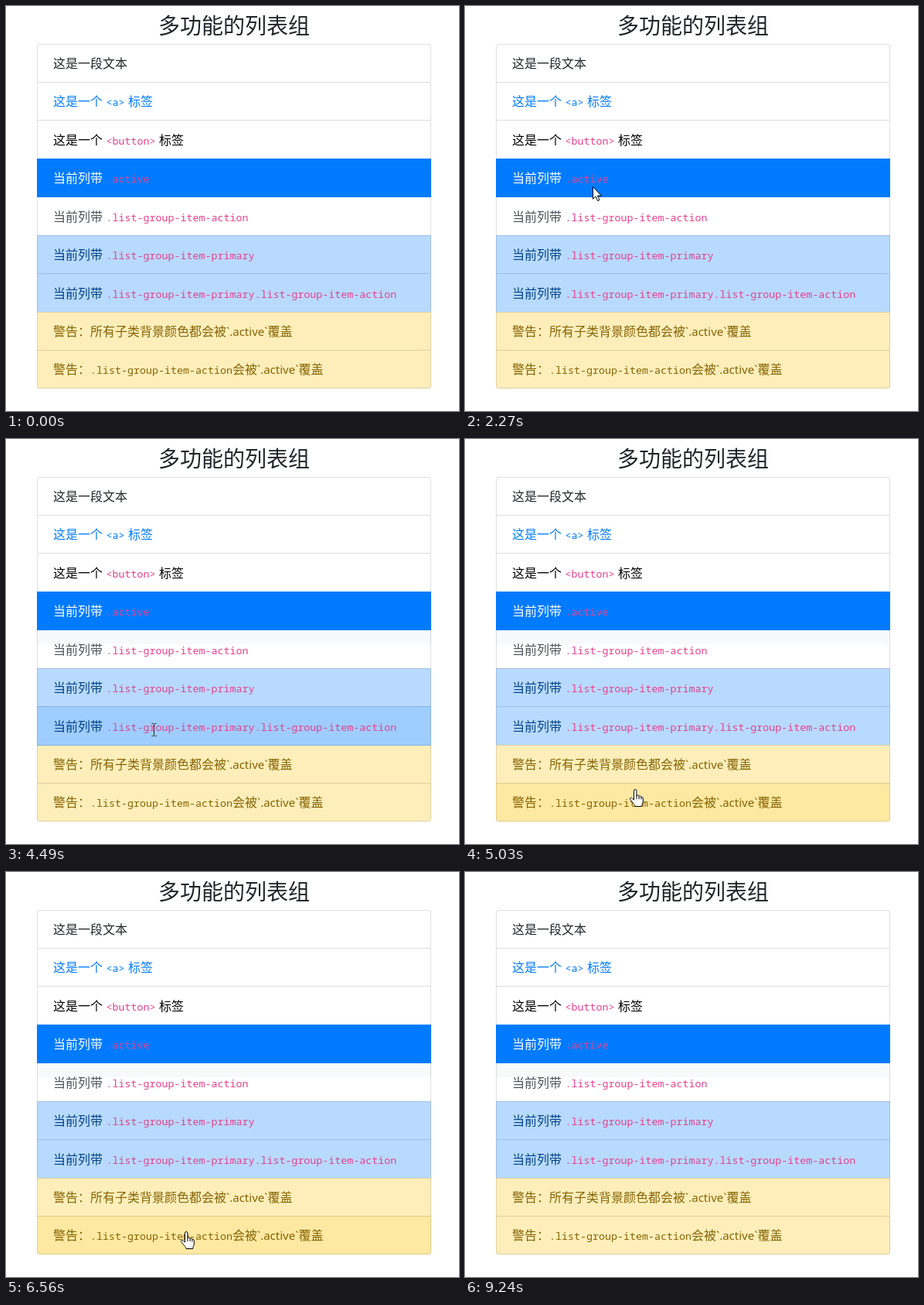
Animation, 586 px wide and 523 px high, one loop 9.34 s. Source, as an HTML page:

```html
<!DOCTYPE html>
<html lang="zh-CN">
<head>
<meta charset="utf-8">
<style>
html, body { margin: 0; width: 100%; height: 100%; overflow: hidden; background: #fff; }
body { position: relative; font: 16px/24px "Noto Sans", "Noto Sans CJK SC", "Noto Sans CJK", sans-serif; word-spacing: .3px; color: #212529; }
h1 { position: absolute; left: 197px; top: 7px; margin: 0; font: 28px/34px "Noto Sans CJK SC", "Noto Sans CJK", sans-serif; white-space: nowrap; }
.row { position: absolute; left: 40px; width: 510px; box-sizing: border-box; padding-left: 20px; border: 1px solid rgba(0,0,0,.125); background: #fff; white-space: nowrap; }
.row:first-child { border-radius: 4px 4px 0 0; }
.row:last-child { border-radius: 0 0 4px 4px; }
.on { z-index: 1; }
code { font: 13.333px/0 "Noto Sans Mono", monospace; color: #e83e8c; }
small { font-size: 15px; line-height: 0; }
.link { color: #007bff; }
.link code, .warn code { color: inherit; }
.link.on { color: #0056b3; text-decoration: underline; }
.button { color: #000; }
.active { z-index: 2; background: #007bff; border-color: #007bff; color: #fff; }
.action { color: #495057; }
.action.on { background: #f8f9fa; }
.action.trail { background: linear-gradient(#f8f9fa 18px, #fff 18px); }
.primary { background: #b8daff; color: #004085; }
.primary.hot.on { background: #9fcdff; }
.warn { background: #ffeeba; color: #856404; }
.warn.on { background: #ffe8a1; }
.focus { outline: 1px dotted #856404; }
svg { position: absolute; left: 0; top: 0; z-index: 3; }
</style>
</head>
<body>
<h1>多功能的列表组</h1>
<div>
<div class="row">这是一段文本</div>
<div class="row link">这是一个 <code>&lt;a&gt;</code> 标签</div>
<div class="row button">这是一个 <code>&lt;button&gt;</code> 标签</div>
<div class="row active">当前列带 <code>.active</code></div>
<div class="row action">当前列带 <code>.list-group-item-action</code></div>
<div class="row primary">当前列带 <code>.list-group-item-primary</code></div>
<div class="row primary hot">当前列带 <code>.list-group-item-primary.list-group-item-action</code></div>
<div class="row warn">警告：所有子类背景颜色都会被<small>`.active`</small>覆盖</div>
<div class="row warn">警告：<code>.list-group-item-action</code>会被<small>`.active`</small>覆盖</div>
</div>
<svg width="586" height="523">
<g id="cursor" fill="#fff" stroke="#000" stroke-linejoin="round">
<path id="arrow" d="M.5.5v15.8l3.6-3.4 2.5 5.7 2.4-1-2.5-5.6h4.9z"/>
<g id="hand" transform="translate(-7.5)">
<path d="M6 14V2.2a1.7 1.7 0 0 1 3.4 0V9c.3-1.3 3-1.3 3.2 0v.8c.4-1.1 2.7-.9 2.8.4v.8c.5-1 2.4-.7 2.4.8v4.2c0 3-1.6 3.4-1.6 6.5H7.5c0-2.5-4-5.5-6.3-9-1-1.8 1.2-2.8 2.6-1.4z"/>
<path d="M9.4 9v4M12.6 9.8v3.4M15.4 11v2.4" fill="none"/>
</g>
<path id="beam" transform="translate(.5 .5)" fill="none" stroke="#222" d="M-3-8h2l1 1 1-1h2M0-7V7M-3 8h2l1-1 1 1h2"/>
</g>
</svg>
<script>
const LOOP = 9340, PITCH = 49.42, TICK = 145;
const $ = id => document.getElementById(id);
const rows = [...document.querySelectorAll('.row')];
const rowTop = i => Math.round(48.6 + PITCH * i);
const textTop = i => Math.round(61 + PITCH * i);

rows.forEach((row, i) => {
  row.style.top = rowTop(i) + 'px';
  row.style.height = rowTop(i + 1) + 1 - rowTop(i) + 'px';
  row.style.paddingTop = textTop(i) - rowTop(i) + 'px';
});

// resting points of the pointer: arrival, departure, x, y
const stops = [
  [400, 400, 552, 50],
  [1420, 1420, 250, 137],
  [2270, 2270, 165, 233],
  [2570, 3230, 169, 275],
  [4490, 4630, 191, 375],
  [5030, 6030, 220, 452],
  [6560, 7010, 233, 464],
  [7710, 7710, 249, 378],
  [8130, 8275, 238, 321],
  [8420, 8420, 430, 466],
  [8570, 8710, 498, 498]
];

// the pointer moves evenly between stops, in whole ticks
function pointer(t) {
  if (t < 400 || t >= 8710) return null;
  const i = stops.findLastIndex(s => t >= s[0]);
  const [, leave, x, y] = stops[i];
  if (t < leave || i === stops.length - 1) return { x, y };
  const [arrive, , nx, ny] = stops[i + 1];
  const n = Math.round((arrive - leave) / TICK);
  const part = Math.floor((t - leave) / (arrive - leave) * n) / n;
  return { x: Math.floor(x + (nx - x) * part), y: Math.floor(y + (ny - y) * part) };
}

function cursorKind(row, p, i) {
  if (!row) return 'arrow';
  if (row.matches('.link, .warn')) return 'hand';
  const code = row.querySelector('code');
  const onText = row.matches('.action, .primary') && p.x > 60 &&
    p.x < code.getBoundingClientRect().right && Math.abs(p.y - textTop(i) - 12) < 10;
  return onText ? 'beam' : 'arrow';
}

function draw(t) {
  const p = pointer(t);
  const over = p && p.x < 550 ? rows.findIndex((_, i) => p.y >= rowTop(i) && p.y < rowTop(i + 1)) : -1;
  const focus = t < 5770 || t >= 9240 ? -1 : t < 6170 ? 7 : 8;

  rows.forEach((row, i) => row.classList.toggle('on', i === over || i === focus));
  rows[4].classList.toggle('trail', over !== 4 && t > 2570);
  rows[7].classList.toggle('focus', focus === 7);

  $('cursor').style.display = p ? '' : 'none';
  if (!p) return;
  const kind = cursorKind(rows[over], p, over);
  for (const id of ['arrow', 'hand', 'beam']) $(id).style.display = id === kind ? '' : 'none';
  $('cursor').setAttribute('transform', `translate(${p.x} ${p.y})`);
}

function tick() {
  draw(performance.now() % LOOP);
  requestAnimationFrame(tick);
}
tick();
</script>
</body>
</html>
```
